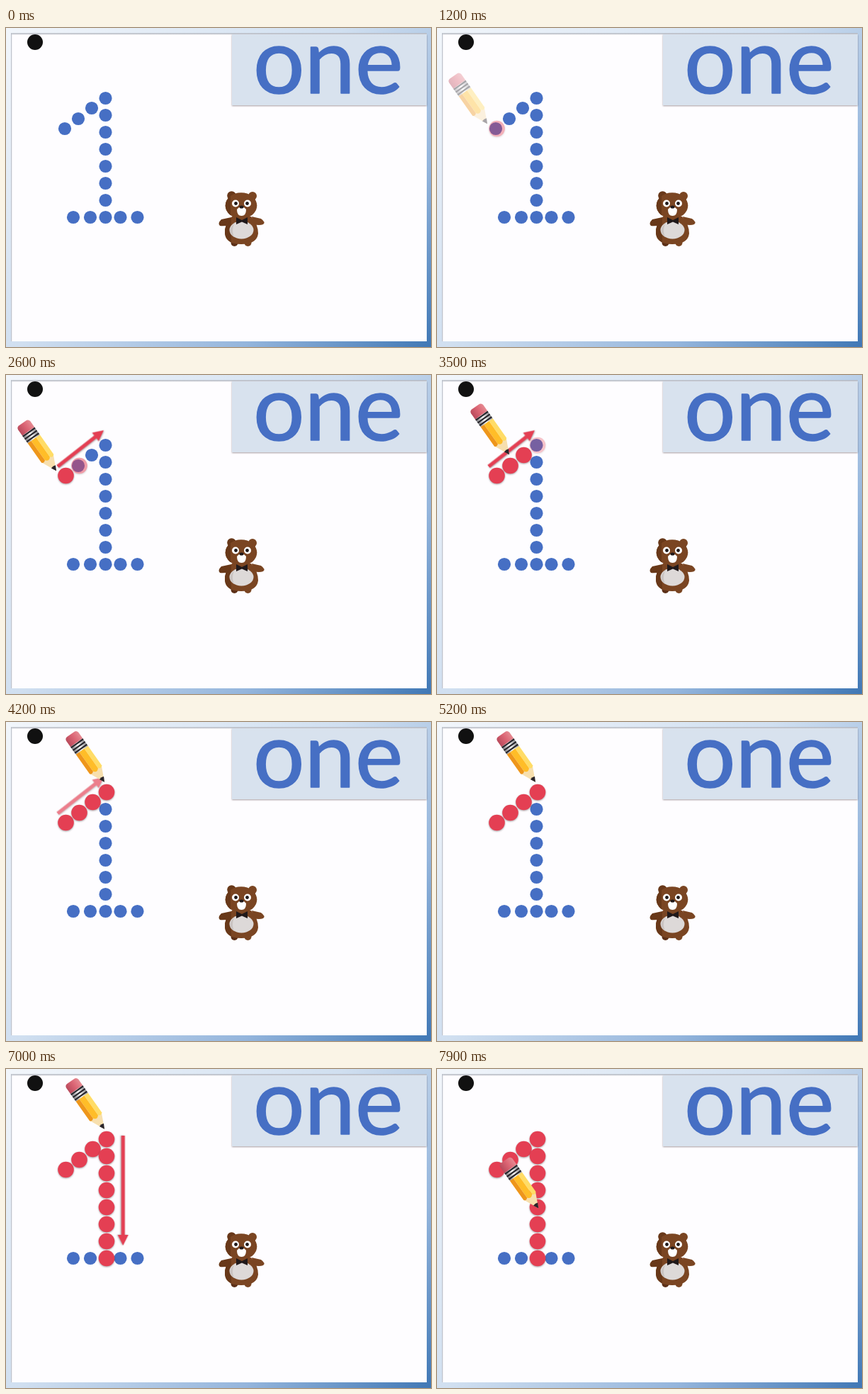
Write an HTML page that moves like this. It is 600 px wide and 450 px high and loops after 8000 ms.

```html
<!DOCTYPE html>
<html lang="en">
<head>
<meta charset="utf-8">
<title>Tracing the number one</title>
<style>
  html, body { margin: 0; width: 100%; height: 100%; overflow: hidden; }
  svg { display: block; width: 100vw; height: 100vh; }
  .word {
    font-family: Lato, sans-serif; font-size: 128px;
    fill: #466fc4; stroke: #466fc4; stroke-width: 1.6px; stroke-linejoin: round;
  }
  .blue { fill: #466fc4; }
  .red { fill: #e43f53; }
  .soft { filter: drop-shadow(0 1px 1px rgba(60, 40, 45, .45)); }
</style>
</head>
<body>
<svg id="stage" viewBox="0 0 600 450">
  <defs>
    <linearGradient id="frame" gradientUnits="userSpaceOnUse" x1="40" y1="-40" x2="560" y2="490">
      <stop offset="0" stop-color="#f2f6fb"/>
      <stop offset=".45" stop-color="#d0dff0"/>
      <stop offset=".75" stop-color="#94b5dc"/>
      <stop offset="1" stop-color="#3f77b5"/>
    </linearGradient>
    <linearGradient id="topShade" x2="0" y2="1">
      <stop offset="0" stop-color="#8d939f"/>
      <stop offset="1" stop-color="#fefdff" stop-opacity="0"/>
    </linearGradient>
    <linearGradient id="leftShade">
      <stop offset="0" stop-color="#9ba2b0"/>
      <stop offset="1" stop-color="#fefdff" stop-opacity="0"/>
    </linearGradient>
    <linearGradient id="rubber" x2="0" y2="1">
      <stop offset="0" stop-color="#e58a92"/>
      <stop offset=".45" stop-color="#dc6675"/>
      <stop offset="1" stop-color="#b94a5c"/>
    </linearGradient>
    <linearGradient id="metal" x2="0" y2="1">
      <stop offset="0" stop-color="#8c8c90"/>
      <stop offset=".5" stop-color="#f5f5f5"/>
      <stop offset="1" stop-color="#77777c"/>
    </linearGradient>
    <path id="body" d="M319 266Q308 277 309 290Q311 305 332 305Q354 305 356 290Q356 277 346 266Z"/>
    <ellipse id="head" cx="332" cy="250.500" rx="22.300" ry="18.300"/>
    <clipPath id="headClip"><use href="#head"/></clipPath>
    <clipPath id="bodyClip"><use href="#body"/></clipPath>
  </defs>

  <rect width="600" height="450" fill="url(#frame)"/>
  <rect x="7" y="7.500" width="587" height="434.500" fill="#fefdff"/>
  <rect x="7" y="7.500" width="587" height="3" fill="url(#topShade)"/>
  <rect x="7" y="7.500" width="2.500" height="434.500" fill="url(#leftShade)"/>
  <circle cx="41" cy="20" r="11" fill="#111"/>

  <rect class="soft" x="319" y="9" width="275" height="100" fill="#d8e2ee"/>
  <text class="word" x="349" y="92.400">one</text>

  <g id="bear">
    <g fill="#7a4522">
      <path d="M318 267L304 270Q298 276 302 279Q306 280 316 278Z" fill="#683819"/>
      <path d="M347 266L360 269Q367 274 363 277Q358 279 349 277Z"/>
      <circle cx="318.500" cy="236.500" r="6.300" fill="#683819"/>
      <circle cx="348" cy="237" r="6"/>
      <ellipse cx="322.500" cy="303" rx="5" ry="5" fill="#5c3018"/>
      <ellipse cx="341.500" cy="303" rx="5" ry="5"/>
      <use href="#body"/>
      <rect x="305" y="264" width="13" height="42" fill="#683819" clip-path="url(#bodyClip)"/>
      <use href="#head"/>
      <rect x="308" y="230" width="9" height="40" fill="#683819" clip-path="url(#headClip)"/>
    </g>
    <ellipse cx="332.500" cy="285" rx="17" ry="12.500" fill="#ddd9d8"/>
    <path d="M322 276Q311 286 322 295Q318 286 322 276Z" fill="#c9c3c1"/>
    <g fill="#fff">
      <circle cx="324" cy="247.500" r="5"/>
      <circle cx="341" cy="247.500" r="5"/>
      <path d="M326 256Q332.500 248 339 256Q339 265 332.500 265Q326 265 326 256Z"/>
    </g>
    <g fill="#20191a">
      <circle cx="324.500" cy="247.500" r="2.400"/>
      <circle cx="340.500" cy="247.500" r="2.400"/>
      <ellipse cx="332.500" cy="252.500" rx="3" ry="2"/>
      <path d="M325 267L333 271L341 267V277L333 273.500L325 277Z"/>
    </g>
  </g>

  <g id="blueDots" class="blue"></g>
  <g id="arrows"></g>
  <g id="redDots" class="red"></g>

  <g id="pencil">
    <g transform="translate(91.300 17.300) rotate(54.700) scale(1.020 1)">
      <path d="M16 -10.500H4Q0 -10 0 -5V6Q0 10 4 10.500H16Z" fill="url(#rubber)"/>
      <rect x="14" y="-10.500" width="13" height="21" fill="url(#metal)"/>
      <path d="M15.500 -10.500V10.500M20 -10.500V10.500M24.500 -10.500V10.500" stroke="#242228" stroke-width="2"/>
      <path d="M60 -10L81 0L60 10Z" fill="#f7dfae"/>
      <path d="M74 -3.700L81 0L74 3.700Q72.500 0 74 -3.700Z" fill="#29242a"/>
      <path d="M27 -10.500H60Q64 -7 60 -4H27Z" fill="#ffdc66"/>
      <path d="M27 -4H60Q65 0 60 4.500H27Z" fill="#ffbd28"/>
      <path d="M27 4.500H60Q63 8 60 10.500H27Z" fill="#ee961b"/>
    </g>
  </g>
</svg>
<script>
const NS = "http://www.w3.org/2000/svg";
const LOOP = 8000, STEP = 100;
const byId = id => document.getElementById(id);

function add(parent, tag, attrs) {
  const node = document.createElementNS(NS, tag);
  for (const key in attrs) node.setAttribute(key, attrs[key]);
  return parent.appendChild(node);
}

const ramp = (t, start, length) => Math.min(1, Math.max(0, (t - start) / length));
const ease = p => p * p * (3 - 2 * p);
const mix = (a, b, p) => a + (b - a) * p;

// Dotted numeral: flag, stem, base
const flag = [[83, 142], [102, 128], [121, 113], [140.5, 99]];
const stem = Array.from({ length: 7 }, (_, i) => [140.5, 123 + 24 * i]);
const base = [95, 119, 161.5, 185.5].map(x => [x, 267]);

for (const [cx, cy] of [...flag, ...stem, ...base])
  add(byId("blueDots"), "circle", { cx, cy, r: 9.1 });

const fadeTimes = i => i === 0 ? [1000, 500]
  : i < 4 ? [1850 + 500 * i, 500]
  : [6300 + 40 * (i - 4), 400];

const redDots = [...flag, ...stem].map(([x, y], i) => ({
  times: fadeTimes(i),
  node: add(byId("redDots"), "circle", { cx: x + 1.5, cy: y, r: 11.3, class: "soft" })
}));

// An arrow lies along its own x axis and is revealed by a soft-edged mask
function makeArrow(name, x, y, angle, length, wipe, fade) {
  const soft = 20;
  const defs = document.querySelector("defs");
  const gradient = add(defs, "linearGradient", { id: name + "Edge", gradientUnits: "userSpaceOnUse" });
  add(gradient, "stop", { offset: 0, "stop-color": "#fff" });
  add(gradient, "stop", { offset: 1, "stop-color": "#000" });
  const area = { x: -10, y: -20, width: length + 30, height: 40 };
  const mask = add(defs, "mask", { id: name, maskUnits: "userSpaceOnUse", ...area });
  add(mask, "rect", { ...area, fill: `url(#${name}Edge)` });

  const group = add(byId("arrows"), "g", {
    transform: `translate(${x} ${y}) rotate(${angle})`, mask: `url(#${name})`
  });
  const neck = length - 15;
  add(group, "path", {
    class: "red soft",
    d: `M0 -2.5H${neck}V-7.5L${length} 0L${neck} 7.5V2.5H0Z`
  });
  return t => {
    const edge = mix(-soft, length + 4, ramp(t, ...wipe));
    gradient.setAttribute("x1", edge);
    gradient.setAttribute("x2", edge + soft);
    const seen = t >= wipe[0] ? 1 - ramp(t, ...fade) : 0;
    group.setAttribute("opacity", seen);
  };
}

const arrows = [
  makeArrow("upArrow", 73, 129, -38.1, 82.6, [1650, 600], [4050, 450]),
  makeArrow("downArrow", 165.3, 94, 90, 155, [5750, 550], [7150, 500])
];

function drawPencil(t) {
  const up = ease(ramp(t, 3030, 1000));
  const down = ease(ramp(t, 7330, 1000));
  const x = mix(-68, 0, up) + 7 * down;
  const y = mix(50.5, 0, up) + 185 * down;
  byId("pencil").setAttribute("transform", `translate(${x} ${y})`);
  byId("pencil").setAttribute("opacity", ramp(t, 1000, 500));
}

function draw(t) {
  for (const { node, times } of redDots) node.setAttribute("opacity", ramp(t, ...times));
  for (const update of arrows) update(t);
  drawPencil(t);
}

const begin = performance.now();
function tick() {
  const t = (performance.now() - begin) % LOOP;
  draw(Math.floor(t / STEP) * STEP);
  requestAnimationFrame(tick);
}
tick();
</script>
</body>
</html>
```
